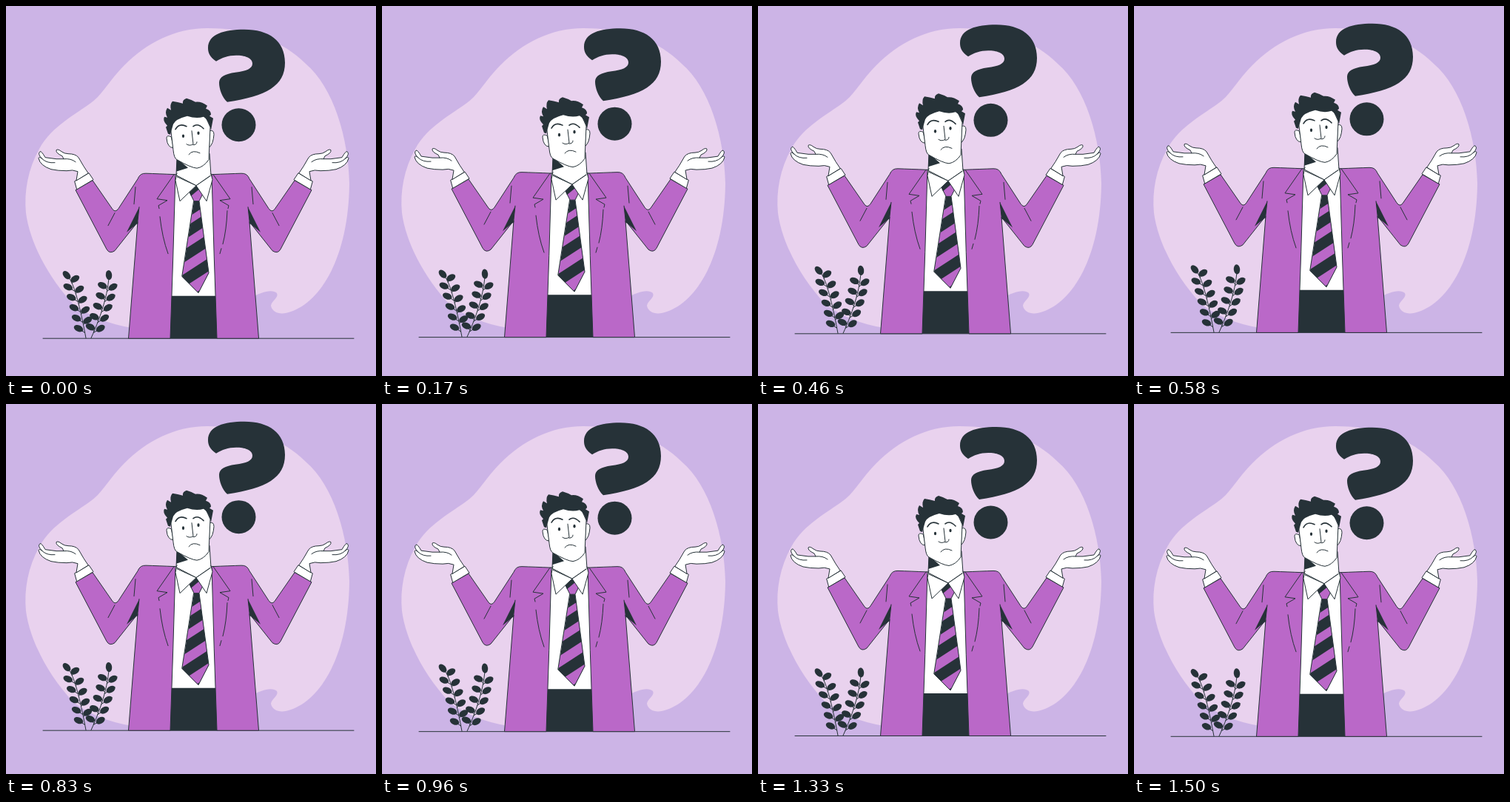
These frames come from a looping animation (500x500 px, 1540 ms). An HTML page:

```html
<!DOCTYPE html>
<html lang="en">
<head>
<meta charset="utf-8">
<title>Shrug</title>
<style>
html, body { margin: 0; height: 100%; overflow: hidden; background: #ccb4e6; }
svg { display: block; width: 100%; height: 100%; }
path { stroke-linecap: round; stroke-linejoin: round; }
.ink { fill: #263238; }
.line { fill: none; stroke: #263238; }
.skin { fill: #fff; stroke: #263238; }
.coat { fill: #ba68c8; stroke: #263238; }
</style>
</head>
<body>
<svg viewBox="0 0 500 500">
  <defs>
    <path id="tie" d="M254 264H261L274 361L260 388L238 366Z"/>
    <clipPath id="tieClip"><use href="#tie"/></clipPath>
    <!-- arm, hand and jacket half, mirrored for the other side -->
    <g id="side">
      <path class="coat" d="M229 228Q205 227 189 226.500Q181 226 178 234L152 274Q148 280 144 275L117 236L94 249L136 329Q140 336 147 331L178 292L165.500 449.500H222Q226 340 229 228Z"/>
      <path class="ink" d="M180 272L163 306L177.500 294Z"/>
      <path class="line" d="M180 272L177.500 295M227 228L204 261L218 263L206 270L207 274M147 280L138 297M175 245L173 268"/>
      <path class="skin" d="M93 237L112 226L118 235L96 248Z"/>
      <path class="skin" d="M95 236L97 224Q90 221 82 223Q70 223 61 221Q46 216 44 206Q45 203 49 207Q42 200 46 197Q48 196 53 205L68 207L78 207L76 203Q67 199 68 195Q70 193 75 197Q79 200 84 200Q94 200 98 205L105 217L111 226Z"/>
      <path class="line" d="M49 207Q55 213 66 212M78 207Q88 206 94 211"/>
    </g>
  </defs>

  <path fill="#e9d2ee" d="M272 30C228 30 190 50 160 80C140 100 130 120 116 130C95 146 62 162 45 193C30 220 24 250 27 280C32 318 56 366 92 404C112 418 138 430 170 435L250 430L330 395C345 386 360 382 366 388C369 394 359 398 358 405C360 415 372 418 385 413C425 400 463 340 464 240C463 180 443 110 405 78C375 48 330 30 272 30Z"/>

  <g id="scene">
    <path class="ink" d="M284 75C275 69 273 63 273 57C273 38 295 32 322 32C355 32 377 47 377 77C377 108 352 122 299 130C292 124 288 112 288 104C288 96 296 92 310 90C325 88 333 85 333 78C333 70 322 67 311 67C300 67 292 70 284 75Z"/>
    <ellipse class="ink" cx="314.500" cy="161" rx="23" ry="22.500"/>
    <g id="plants"></g>
    <path class="line" d="M50 449.500H470"/>

    <path fill="#fff" d="M229 228H278L286 395H222Z"/>
    <path class="ink" d="M222 392H285V449.500H222Z"/>
    <path class="skin" d="M231 205L230 229L257 243L277 229L275 200Z"/>
    <path class="ink" d="M231 206L246 219L230 224Z"/>
    <use href="#side"/>
    <use href="#side" transform="matrix(-1 0 0 1 507 0)"/>
    <path class="line" d="M208 285Q211 313 219 335M299 277Q298 303 293 322M291 328L289 335"/>

    <use href="#tie" class="ink"/>
    <g id="stripes" clip-path="url(#tieClip)" stroke="#ba68c8"></g>
    <use href="#tie" class="line"/>
    <path class="coat" d="M257 243L248 252L254 264H261L267 252Z"/>
    <path class="ink" d="M257 243L248 252L250 257L262 247Z"/>
    <path class="skin" d="M231 226L229 236L235 264L257 243L231 231M277 227L279 235L271 264L257 243L276 230"/>

    <path class="skin" d="M223 177Q217 174 217 179Q218 192 226 192ZM275 169Q281 167 281 174Q280 187 275 191Z"/>
    <path class="skin" d="M222 162L226 195Q227 206 231 208Q250 219 258 219.500Q267 218 274 208L276 164L268 146L235 148Z"/>
    <path class="ink" d="M219 173L216 164L218 162Q211 155 214 150L218 151Q214 144 218 138L223 141Q221 133 225 129Q232 130 239 132Q238 127 244 125Q251 127 256 130Q264 129 272 135L270 139Q277 141 277 147L275 149L280 152L277 168Q274 154 267 150Q257 153 245 149Q229 153 226 160L222 174Z"/>
    <path class="line" stroke-width="1.600" d="M229 167Q234 158 244 163M253 163Q259 158 267 166"/>
    <ellipse class="ink" cx="239.500" cy="176" rx="1.600" ry="2.300"/>
    <ellipse class="ink" cx="260" cy="172" rx="1.600" ry="2.300"/>
    <path class="line" d="M251 169L253 187Q248 190 244 187M253 188Q258 188 258 184M247 201Q252 194 262 199"/>
  </g>
</svg>
<script>
const LOOP = 1540, PEAK = 717, RISE = 8.6, REST = -0.2;
const $ = id => document.getElementById(id);
const range = n => [...Array(n).keys()];

const leaf = (x, y, angle) =>
  `<ellipse class="ink" rx="6.6" ry="4.2" transform="translate(${x} ${y}) rotate(${angle})"/>`;

// A bent stem with evenly spaced leaves on both sides.
function plant({ top, foot, bend, leftY, rightY, tipAngle }) {
  const stemX = y => top + (foot - top) * ((y - 365) / 84) ** bend;
  const stem = range(15).map(i => 365 + 6 * i).map(y => `${stemX(y)} ${y}`);
  const twig = (y, dx, angle) =>
    `<path class="line" d="M${stemX(y) + dx} ${y}L${stemX(y + 6)} ${y + 6}"/>` +
    leaf(stemX(y) + dx, y, angle);
  return `<path class="line" d="M${stem.join('L')}"/>` + leaf(top, 364, tipAngle) +
    range(5).map(i => twig(leftY + 14 * i, -7.5, 24) + twig(rightY + 14 * i, 7, -32)).join('');
}
$('plants').innerHTML =
  plant({ top: 82, foot: 108, bend: 0.6, leftY: 380, rightY: 369, tipAngle: 48 }) +
  plant({ top: 139, foot: 115, bend: 1.6, leftY: 378, rightY: 380, tipAngle: 85 });

// Tie stripes widen and spread towards the tip.
$('stripes').innerHTML = range(4).map(i => {
  const y = 284 + 27 * i + 1.5 * i * i;
  return `<path stroke-width="${9 + 2 * i}" d="M237 ${y + 13}L277 ${y - 13}"/>`;
}).join('');

function frame(now) {
  const phase = (now % LOOP - PEAK) / LOOP * 2 * Math.PI;
  const y = REST - RISE * (1 + Math.cos(phase)) / 2;
  $('scene').setAttribute('transform', `translate(0 ${y.toFixed(2)})`);
  requestAnimationFrame(frame);
}
frame(performance.now());
</script>
</body>
</html>
```
